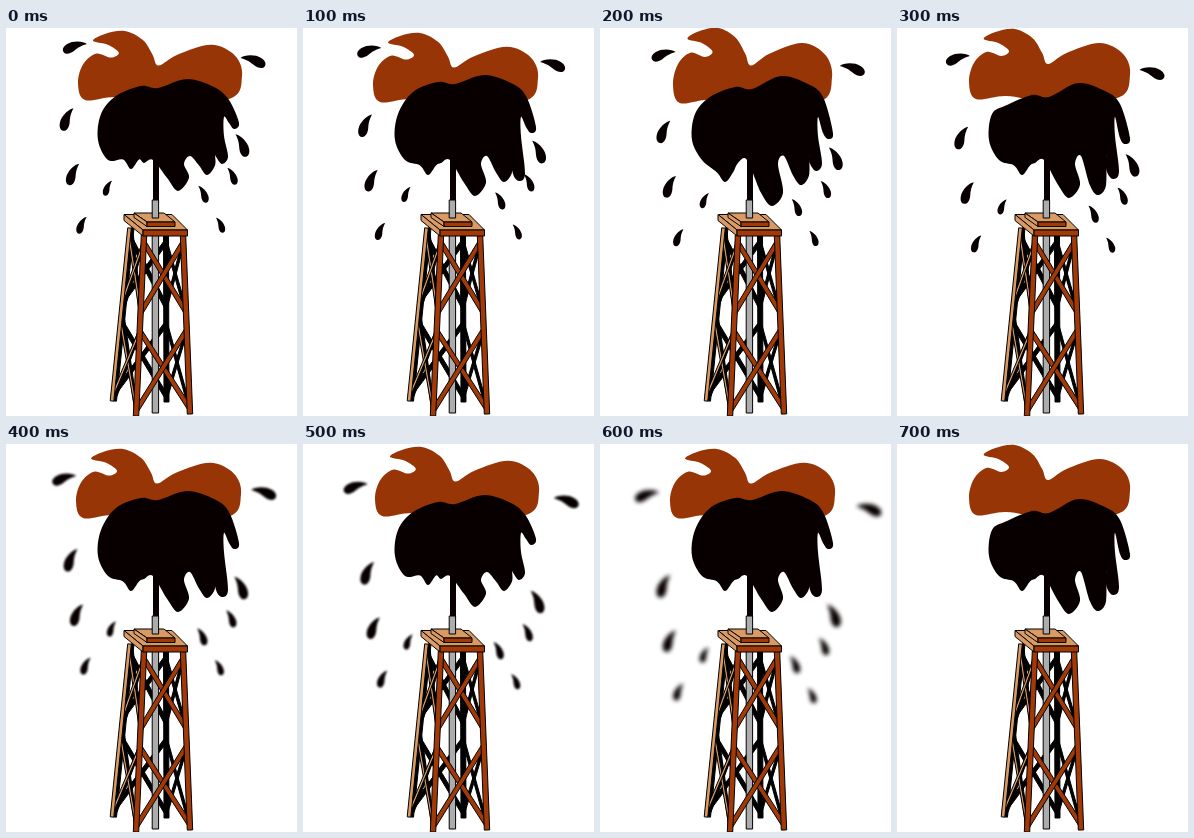
An HTML page for the animation above (800 ms loop, 291 by 388 pixels).

```html
<!DOCTYPE html>
<html lang="en">
<head>
<meta charset="utf-8">
<title>Oil derrick</title>
<style>
html, body { margin: 0; width: 100%; height: 100%; overflow: hidden; background: #fff; }
svg { display: block; width: 100%; height: 100%; }
</style>
</head>
<body>
<svg viewBox="0 0 291 388">
  <g id="drops" fill="#080000"></g>
  <path id="cloud" fill="#983506"/>
  <path id="oil" fill="#080000"/>
  <path d="M147 125h6v49h-6z" fill="#080000"/>
  <g id="tower" stroke="#000" stroke-width="1" stroke-linejoin="round"></g>
</svg>
<script>
const NS = 'http://www.w3.org/2000/svg';
const STEP = 100, STEPS = 8;
const RUST = '#a13a08', TAN = '#d99b63', GREY = '#acacac', BLACK = '#000';
const $ = id => document.getElementById(id);

function add(parent, tag, attrs) {
  const el = document.createElementNS(NS, tag);
  for (const k in attrs) el.setAttribute(k, attrs[k]);
  return parent.appendChild(el);
}

// Closed smooth curve through the points
function smooth(p) {
  const at = i => p[(i + p.length) % p.length];
  return p.reduce((d, b, i) => {
    const a = at(i - 1), c = at(i + 1), e = at(i + 2);
    const h1 = [b[0] + (c[0] - a[0]) / 6, b[1] + (c[1] - a[1]) / 6];
    const h2 = [c[0] - (e[0] - b[0]) / 6, c[1] - (e[1] - b[1]) / 6];
    return `${d}C${h1} ${h2} ${c}`;
  }, 'M' + p[0]) + 'Z';
}

// Cloud: one outline fitted into a box
const outline = [
  [85, 14], [97, 7], [117, 4], [135, 13], [145, 28], [151, 39], [170, 28],
  [204, 18], [228, 29], [235, 50], [222, 73], [150, 76], [108, 71], [77, 74],
  [70, 57], [75, 38], [88, 27], [103, 31], [111, 26], [100, 18]
];
const cloud = ([left, right, top, bottom]) => smooth(outline.map(([x, y]) => [
  left + (x - 70) * (right - left) / 165,
  top + (y - 4) * (bottom - top) / 70
]));

// Oil: a fixed body with drips of varying length, right to left
const drip = (x, tip, r) => [[x + r, tip - r * 1.2], [x, tip], [x - r, tip - r * 1.2]];
const oil = ({ crest, hump, tips: [a, b, c, d, e] }) => smooth([
  [110, hump + 10], [135, hump], [152, hump + 2],
  [181, crest], [208, crest + 8], [223, crest + 21],
  ...drip(228, a, 5), [218, 89], [218, 108],
  ...drip(216, b, 6), [209, 127],
  ...drip(201, c, 8), [184, 128], [178, 136],
  ...drip(172, d, 11), [147, 132], [138, 135],
  ...drip(125, e, 8), [102, 132], [92, 112], [95, 86]
]);

const shapes = [
  { box: [72, 236, 3, 72], crest: 51, hump: 58, tips: [101, 136, 147, 163, 141] },
  { box: [73, 232, 0, 75], crest: 48, hump: 59, tips: [111, 143, 157, 178, 154] },
  { box: [70, 235, 5, 74], crest: 47, hump: 54, tips: [105, 153, 154, 168, 147] },
  { box: [72, 233, 1, 71], crest: 55, hump: 67, tips: [116, 151, 167, 170, 147] }
].map(s => ({ cloud: cloud(s.box), oil: oil(s) }));
const order = [0, 2, 1, 3, 2, 0, 2, 3];

// Drops: x, y, length; the first of each side flies off sideways
const COMMA = 'M.5-.5C.1-.45-.5-.1-.5.2C-.5.4-.3.5-.05.5C.3.5.45.3.4.1C.36-.06.3-.2.5-.5Z';
const sides = [
  [-1, [[68, 18, 24], [60, 91, 24], [66, 146, 23], [101, 160, 16], [75, 197, 18]]],
  [1, [[248, 32, 25], [237, 117, 24], [227, 148, 18], [198, 166, 18], [215, 197, 16]]]
];
const drops = sides.flatMap(([side, list]) => list.map(([x, y, len], i) => {
  const turn = i ? -side * 11 : -side * 58;
  return {
    side, x, y, top: !i,
    el: add($('drops'), 'path', { d: COMMA }),
    tail: `rotate(${turn}) scale(${-side * len * .44} ${len})`
  };
}));

function moveDrops(t) {
  const fall = 6.2 * t + 6.8 * Math.max(0, t - 4);
  for (const { el, side, x, y, top, tail } of drops) {
    const drift = side < 0 ? 4 * Math.sin(Math.PI * t / 8) : -.05 * fall;
    const dx = top ? side * .43 * fall : drift;
    const dy = fall * (top ? .64 : side < 0 ? 1 : 1.07);
    el.setAttribute('transform', `translate(${x + dx} ${y + dy}) ${tail}`);
  }
  const blur = t < 4 ? 0 : t < 6 ? 1 : 2.1;
  $('drops').style.filter = blur ? `blur(${blur}px)` : 'none';
  $('drops').style.display = t < STEPS - 1 ? '' : 'none';
}

// Tower
const face = (points, fill) => add($('tower'), 'polygon', { points, fill });

function beam([x1, y1], [x2, y2], w, fill) {
  const l = Math.hypot(x2 - x1, y2 - y1);
  const nx = (y1 - y2) / l * w / 2, ny = (x2 - x1) / l * w / 2;
  face([x1 + nx, y1 + ny, x2 + nx, y2 + ny, x2 - nx, y2 - ny, x1 - nx, y1 - ny].join(' '), fill);
}

const along = ([a, b], f) => [a[0] + (b[0] - a[0]) * f, a[1] + (b[1] - a[1]) * f];

// Two crosses between a pair of legs
function truss(p, q, w, fill) {
  for (const [from, to] of [[.04, .43], [.53, .97]]) {
    beam(along(p, from), along(q, to), w, fill);
    beam(along(q, from), along(p, to), w, fill);
  }
}

const legs = {
  left: [[123.5, 200], [106, 373]],
  back: [[160, 207], [160.5, 374]],
  near: [[138, 207], [130, 388]],
  right: [[177, 207], [184, 386]]
};
const shade = legs.left.map(([x, y]) => [x + 3, y]);

truss(legs.left, legs.back, 4, BLACK);
truss(legs.back, legs.right, 2.5, BLACK);
beam(...legs.back, 5, BLACK);
face('146.2,206 152.6,206 152.6,385 146.2,385', GREY);
truss(shade, legs.near, 3, BLACK);
beam(...shade, 3, BLACK);
truss(legs.left, legs.near, 2.2, TAN);
beam(...legs.left, 3.6, TAN);
truss(legs.near, legs.right, 4.6, RUST);
beam(...legs.near, 5.4, RUST);
beam(...legs.right, 5.4, RUST);

// A slab with its top, left and front faces
function slab(x1, x2, y1, x3, x4, y2, h) {
  face([x1, y1, x2, y1, x4, y2, x3, y2].join(' '), TAN);
  face([x1, y1, x3, y2, x3, y2 + h, x1, y1 + h].join(' '), TAN);
  face([x3, y2, x4, y2, x4, y2 + h, x3, y2 + h].join(' '), RUST);
}
slab(118, 166, 186.5, 137, 181.5, 202, 6);
slab(128, 158, 185, 141, 169, 194, 4.5);
face('146.2,172 152.6,172 152.6,190 146.2,190', GREY);

function show(t) {
  const s = shapes[order[t]];
  $('cloud').setAttribute('d', s.cloud);
  $('oil').setAttribute('d', s.oil);
  moveDrops(t);
}

const start = performance.now();
let last = 0;
show(0);
function tick() {
  const t = Math.floor((performance.now() - start) / STEP) % STEPS;
  if (t !== last) show(last = t);
  requestAnimationFrame(tick);
}
requestAnimationFrame(tick);
</script>
</body>
</html>
```
